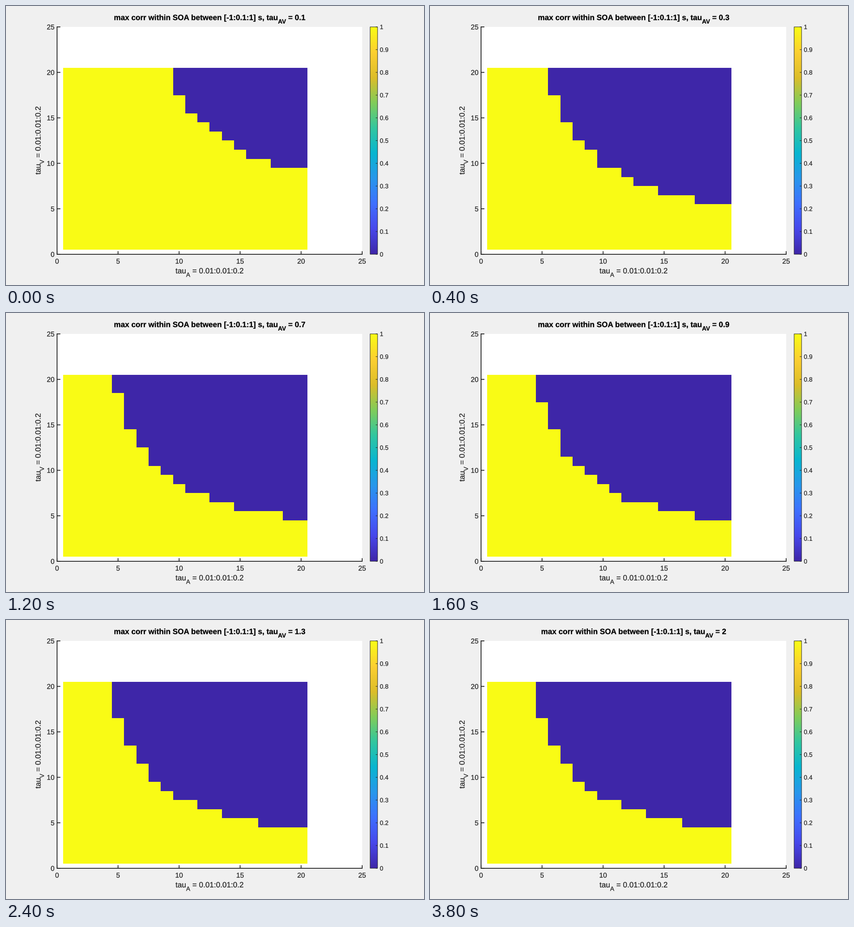
A matplotlib script for the animation above (4 s loop, 900 by 600 pixels).

```python
import numpy as np
import matplotlib.pyplot as plt
from matplotlib.animation import FuncAnimation
from matplotlib.colors import LinearSegmentedColormap
from matplotlib.patches import PathPatch, Rectangle
from matplotlib.path import Path
from matplotlib.textpath import TextPath
from matplotlib.transforms import Affine2D

W, H, N = 900, 600, 20
INK = (0.15, 0.15, 0.15)
LEFT, RIGHT, TOP, BOTTOM = 109.9, 766.8, 44.94, 533.94
BAR = (784, 800)

cmap = LinearSegmentedColormap.from_list("bluegold", [
    "#3e26a8", "#4747eb", "#3e6fff", "#2797eb", "#08b5d0",
    "#31c69f", "#81cc59", "#dcbd29", "#fccf30", "#f9fb15"])


def px(x):
    return LEFT + (RIGHT - LEFT) * x / 25


def py(y):
    return BOTTOM - (BOTTOM - TOP) * y / 25


def region(tenths):
    """1 below a hyperbola-like limit that shrinks as tau_AV grows, else 0."""
    x = np.arange(1, N + 1)
    y = x[:, None]
    limit = 30.416 + 30.874 * tenths ** -1.27
    return (x * y < limit * (x + y) ** 0.32).astype(float)


def glyphs(s, size, weight):
    return TextPath((0, 0), s, size=size,
                    prop=dict(family="Liberation Sans", weight=weight))


def advance(s, size, weight):
    def ink(t):
        return glyphs(t, size, weight).get_extents().width
    return ink(f"|{s}|") - ink("||")


def text_path(parts, x, y, size, align=0.5, weight="normal", angle=0):
    """Path for a run of parts; every second part is a subscript."""
    pen, pieces = 0, []
    for i, s in enumerate(parts):
        sz, drop = (size * 0.8, -size * 0.45) if i % 2 else (size, 0)
        pieces.append(glyphs(s, sz, weight).transformed(
            Affine2D().translate(pen, drop)))
        pen += advance(s, sz, weight)
    place = (Affine2D().translate(-align * pen, 0).scale(1, -1)
             .rotate_deg(angle).translate(x, y))
    return Path.make_compound_path(*pieces).transformed(place)


def write(parts, x, y, size, color=INK, **kw):
    path = text_path(parts, x, y, size, **kw)
    return ax.add_patch(PathPatch(path, color=color, lw=0.2, zorder=5))


def line(xs, ys, width):
    ax.plot(xs, ys, color=INK, lw=width * 0.72, solid_capstyle="butt",
            snap=False, zorder=4)


fig = plt.figure(figsize=(W / 100, H / 100), dpi=100, facecolor="#f0f0f0")
ax = fig.add_axes([0, 0, 1, 1])
ax.axis("off")

ax.add_patch(Rectangle((110, 45), 657, 489, fc="white", lw=0))
edges = np.arange(N + 1) + 0.5
mesh = ax.pcolormesh(np.round(px(edges)), np.round(py(edges)), region(1),
                     cmap=cmap, vmin=0, vmax=1, antialiased=False)

# Axes, ticks and labels
line([LEFT, LEFT], [TOP - 0.9, BOTTOM + 0.9], 1.8)
line([LEFT, RIGHT + 0.9], [BOTTOM, BOTTOM], 1.8)
for v in range(0, 26, 5):
    line([px(v)] * 2, [BOTTOM, BOTTOM - 6.6], 1.8)
    line([LEFT, LEFT + 7.2], [py(v)] * 2, 1.8)
    write([str(v)], px(v), 554, 15)
    write([str(v)], 104.5, py(v) + 5.4, 15, align=1)
write(["tau", "A", " = 0.01:0.01:0.2"], 438.3, 575, 16.5)
write(["tau", "V", " = 0.01:0.01:0.2"], 74.5, 289, 16.5, angle=-90)

# Colour bar
levels = np.linspace(0, 1, 256)[:, None]
ax.pcolormesh(BAR, np.linspace(534, 45, 257), levels, cmap=cmap,
              vmin=0, vmax=1, antialiased=False)
ax.add_patch(Rectangle((BAR[0], TOP), BAR[1] - BAR[0], BOTTOM - TOP, fill=False,
                       ec=INK, lw=0.72, snap=False, zorder=4))
for k in range(11):
    y = py(k * 2.5)
    line([BAR[1] - 4, BAR[1]], [y, y], 1)
    write([f"{k / 10:g}"], 804.8, y + 4.8, 13.5, align=0)

ax.set_xlim(0, W)
ax.set_ylim(H, 0)


def title_parts(tenths):
    return ["max corr within SOA between [-1:0.1:1] s, tau", "AV",
            f" = {tenths / 10:g}"]


TITLE = dict(x=438.5, y=30.3, size=16.5, weight="bold")
title = write(title_parts(1), color="black", **TITLE)


def update(i):
    mesh.set_array(region(i + 1))
    title.set_path(text_path(title_parts(i + 1), **TITLE))
    return mesh, title


anim = FuncAnimation(fig, update, frames=20, interval=200, repeat=True,
                     repeat_delay=0)
plt.show()
```
